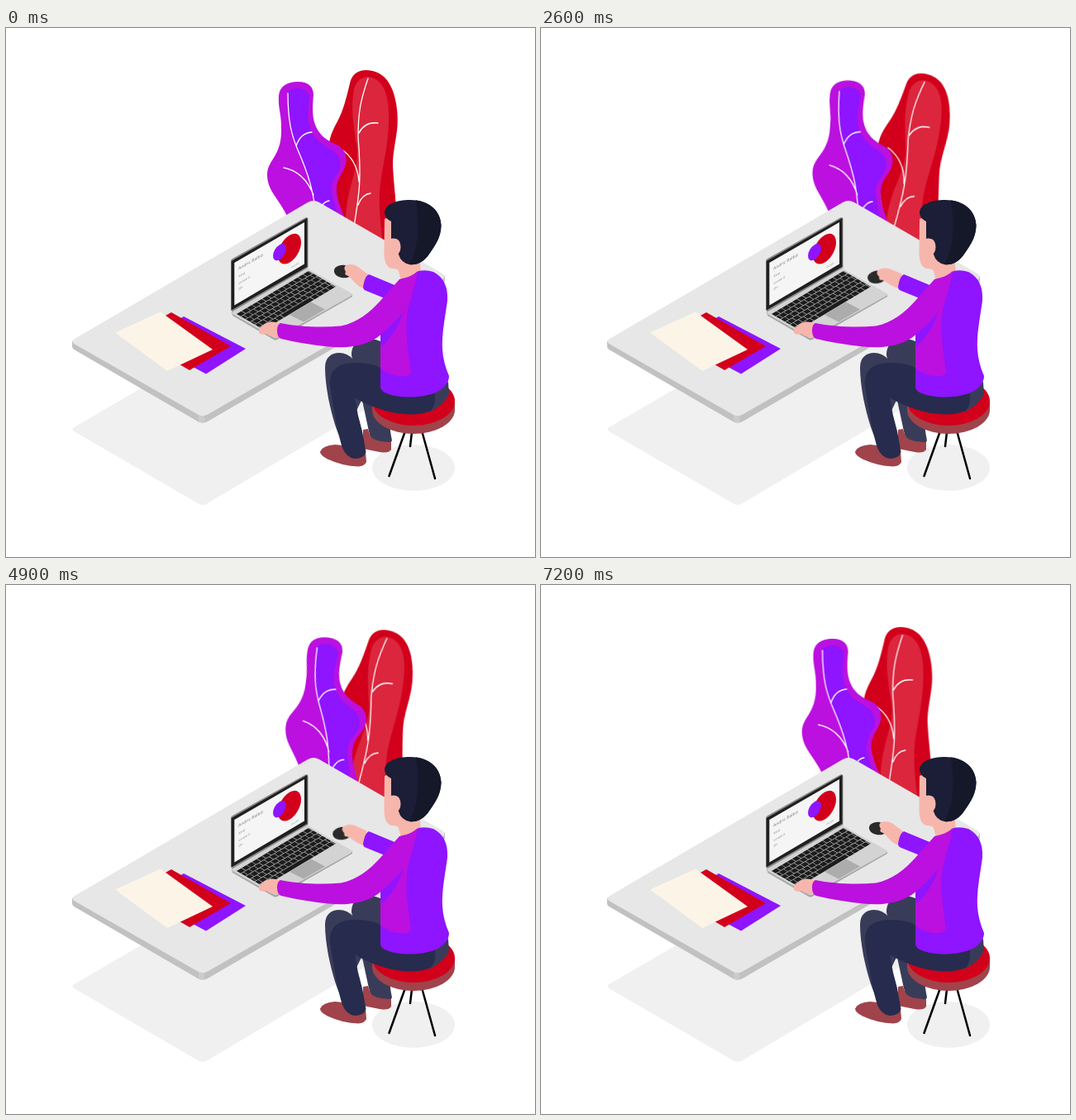
An HTML page for the animation above (8 s loop, 640 by 640 pixels).

```html
<!DOCTYPE html>
<html lang="en">
<head>
<meta charset="utf-8">
<title>Desk work</title>
<style>
html, body { margin: 0; width: 100%; height: 100%; overflow: hidden; background: #fff; }
svg { display: block; width: 100vw; height: 100vh; }
text { font-family: "Open Sans", sans-serif; fill: #777; }
.vein { fill: none; stroke: #fff; stroke-width: 1.3; stroke-linecap: round; }
.keys { fill: none; stroke: #1c1c1c; stroke-width: 4.8; stroke-dasharray: 5.5 .7; }
.skin { fill: #f7b6ac; }
.navy { fill: #272b4d; }
.slate { fill: #393c59; }
.violet { fill: #8f14ff; }
.magenta { fill: #bb10df; }
.red { fill: #d2001b; }
.brick { fill: #a0434b; }
.floor { fill: #f0f0f0; }

/* The whole scene moves in 100 ms steps. */
.sway { animation: 8s infinite; }
.leaf-red { transform-origin: 413px 295px; animation-name: leaf-red; }
.leaf-violet { transform-origin: 382px 342px; animation-name: leaf-violet; }
.hand { transform-origin: 434px 305px; animation-name: hand; }
@keyframes leaf-red {
  0% { transform: rotate(0deg); animation-timing-function: steps(36); }
  45% { transform: rotate(8.9deg); animation-timing-function: steps(36); }
  90%, 100% { transform: rotate(-.15deg); }
}
@keyframes leaf-violet {
  0% { transform: rotate(0deg); animation-timing-function: steps(48); }
  60% { transform: rotate(8deg); animation-timing-function: steps(24); }
  90%, 100% { transform: rotate(-.1deg); }
}
@keyframes hand {
  0% { transform: rotate(0deg); animation-timing-function: steps(36); }
  45% { transform: rotate(-20deg); animation-timing-function: steps(36); }
  90%, 100% { transform: rotate(0deg); }
}
</style>
</head>
<body>
<svg viewBox="0 0 640 640">
  <!-- floor shadows -->
  <path class="floor" d="M84 482L366 318Q372 314 379 318L515 396Q522 401 515 414L244 575Q238 579 232 575L84 489Q77 485 84 482Z"/>
  <ellipse class="floor" cx="493" cy="532" rx="50" ry="28"/>

  <g class="sway leaf-red">
    <path class="red" d="M416 67C419 54 428 51 436 51C455 52 463 63 468 76C473 90 475 108 473 124C471 140 468 151 468 166C469 190 473 215 475 265L420 262C408 235 394 190 391 155C389 136 394 126 401 113C408 100 412 84 416 67Z"/>
    <path fill="#db263d" d="M437 59C427 60 421 68 420 80C417 105 422 125 425 148C426 175 411 195 411 235L456 262C453 235 450 210 453 188C456 165 463 140 463 110C464 85 458 60 437 59Z"/>
    <path class="vein" d="M438 61C429 87 426 102 426 132C430 180 428 198 421 240M427 127Q434 113 450 115M403 145Q425 158 427 186M426 214Q431 201 441 200"/>
  </g>

  <g class="sway leaf-violet">
    <path class="magenta" d="M346 250C343 215 316 203 316 178C316 160 332 156 333 127C334 104 329 99 330 82C331 70 341 65 353 65C367 65 372 72 372 81C371 93 370 106 374 117C380 133 393 138 402 142C410 147 413 156 411 165C409 174 401 181 400 192C399 206 405 217 411 232V250Z"/>
    <path class="violet" d="M340 78Q345 73 354 73Q366 74 367 84C366 96 364 108 367 118C371 135 385 142 395 148C403 153 405 161 404 168C402 177 394 184 394 194C394 208 402 218 404 250L378 250C374 190 363 173 351 145C343 120 341 105 340 78Z"/>
    <path class="vein" d="M341 79C341 114 346 130 352 145C364 173 373 193 378 250M351 143Q356 127 370 126M336 169Q361 174 372 202M391 209Q382 210 377 226"/>
  </g>

  <!-- desk -->
  <path fill="#c1c1c1" d="M80 379L372 214L531 300V306Q530 310 526 312L244 476Q238 479 232 476L84 390Q80 388 80 385Z"/>
  <path fill="#cbcbcb" d="M233 468H240V477.500Q236 478 233 476.500Z"/>
  <path fill="#e7e7e7" d="M84 375.500L365 211Q372 207 379 211L527 296.500Q534 301 527 305L244 467.500Q238 471 232 467.500L84 383Q77 379 84 375.500Z"/>

  <!-- papers -->
  <path class="violet" d="M215 349L290 388L242 418.500L166 378Z"/>
  <path class="red" d="M200 344L272 385L222 414L150 372Z"/>
  <path fill="#fdf4e8" d="M132 368.500L187 343.500L250 389L195 415Z"/>

  <!-- laptop base -->
  <path fill="#a6a6a6" d="M273 343L365 292L419 322V325L328 377Q326 378 324 377L274 348Z"/>
  <path fill="#d3d3d3" d="M274 343L365 291L418 321Q420 322.500 418 324L328 374.500Q326 375.500 324 374.500L274 346Z"/>
  <g transform="matrix(1 -.598 1 .576 279 346)">
    <path fill="#a4a4a4" d="M0 0H87V33H0Z"/>
    <path class="keys" d="M0 2.500H87"/>
    <path class="keys" stroke-dashoffset="3" d="M0 8.100H87"/>
    <path class="keys" stroke-dashoffset="1" d="M0 13.700H87"/>
    <path class="keys" stroke-dashoffset="4" d="M0 19.300H87"/>
    <path class="keys" stroke-dashoffset="2" d="M0 24.900H87"/>
    <path class="keys" d="M0 30.500H24M61.500 30.500H87"/>
    <path class="keys" style="stroke-dasharray:none" d="M25 30.500H60.500"/>
  </g>
  <path fill="#acacac" d="M343 347L369 331.500L386 340.500L360 355.500Z"/>

  <!-- laptop screen -->
  <path fill="#8a8a8a" d="M272 282Q272 280 274 279L363 229Q365 229 365.500 231V290L274 343L272 341Z"/>
  <path fill="#1f1f1f" d="M272.700 282L364.500 229.800V288.800L272.700 341.500Z"/>
  <path fill="#f5f5f5" d="M276.300 284L361 235V285.500L276.300 335.500Z"/>
  <g transform="matrix(1 -.577 0 1 281 293)">
    <ellipse class="red" cx="62" cy="10" rx="14" ry="16.500"/>
    <ellipse class="violet" cx="50" cy="7" rx="8" ry="9"/>
    <text font-size="5" y="0">Andric Balbis</text>
    <g font-size="3.600">
      <text x=".5" y="9">Kind</text>
      <text x=".5" y="17.500">Lorem it</text>
      <text x=".5" y="24.500">On</text>
      <text x="64" y="35" style="fill:#999">mollit</text>
    </g>
  </g>

  <!-- typing hand -->
  <path class="skin" d="M332 357Q321 354 315 357L309 361Q305 364 306 369Q309 372 315 370Q321 375 333 374Z"/>

  <!-- mouse hand -->
  <g class="sway hand">
    <path fill="#2a2a2a" d="M397 295C396 290 402 286 410 287C417 289 419 295 417 300C412 304 399 303 397 295Z"/>
    <path class="skin" d="M410 293Q408 288 413 286.500Q420 284.500 426 289L438 298L434 315Q427 314 421 307Q416 301 413 299.500Q409 299 411 295Z"/>
  </g>
  <path class="violet" d="M439 298Q434 300 432 313Q432 317 436 318L463 329L475 313Z"/>

  <!-- far leg -->
  <path class="slate" d="M418 396C418 381 428 376 438 376Q449 376 456 381L466 440L463 465Q464 485 467 499Q463 508 451 505Q441 500 439 488L430 446Z"/>
  <path class="brick" d="M432 486L438 485Q440 497 449 499Q459 501 466 501V510Q463 515 452 513L432 509Z"/>

  <!-- stool -->
  <g fill="none" stroke="#000" stroke-width="2.500" stroke-linecap="round">
    <path d="M482.500 489L463.500 542M503.500 489L519 545M491 489L489 506"/>
  </g>
  <path class="brick" d="M443 451V462A50 29 0 0 0 543 462V451Z"/>
  <ellipse class="red" cx="493" cy="451.500" rx="50" ry="29.500"/>

  <!-- near leg -->
  <path class="brick" d="M380 512.500Q383 505 398 504L408 505L435 512L436 525Q434 530 426 530.500Q407 530 389 521.500Q380 517 380 512.500Z"/>
  <path class="slate" d="M386 411C386 398 394 393 403 393Q413 393 420 401L453 410L440 430L406 500Q397 482 390 448Q386 426 386 411Z"/>
  <path class="slate" d="M510 440L535 428L536 443Q530 456 512 465Z"/>
  <path class="navy" d="M392 432C391 415 400 406 420 405Q440 404 453 411V436L519 442Q520 457 514 463C495 471 468 467 450 460Q434 455 422 447Q425 468 431 488L435.500 513Q433 521 422 521Q412 520 407 508Q400 487 392 432Z"/>

  <!-- neck and face -->
  <path class="skin" d="M466 228L458 231L457.500 270Q457 288 466 291Q474 291 475 294L478 306Q492 309 502 295L500 276Z"/>

  <!-- torso and near arm -->
  <path class="violet" d="M480 304Q495 299 499 294Q508 292 517 295C531 302 535 316 534 330C531 352 527 370 528 389Q529 405 536 421Q536 428 531 433C521 447 480 451 458 441Q453 438 453 434V370Z"/>
  <path class="magenta" d="M478 304Q491 301 498 294C496 309 490 325 486 342C482 370 487 390 490 417Q486 424 469 420Q458 417 453 411V383L465 335Z"/>
  <path class="violet" d="M481 340Q470 351 454 372V386Q476 365 481 340Z"/>
  <path class="magenta" d="M332 357C352 361 380 363 405 360.500C425 357 441 343 452 331L476 304L492 300Q493 319 485 337C477 350 463 363 451 373C436 385 411 388 390 385.500Q357 382 333 376Q328 374 328 366Q328 359 332 357Z"/>

  <!-- hair and ear -->
  <path fill="#1b1e36" d="M458 224C458 213 472 208 489 208C511 208 526 221 526.500 239C526 253 520 262 513 272C505 284 497 287 488 286Q478 284 475 274L466 255V234Q459 231 458 224Z"/>
  <path fill="#151829" d="M496 208.500C514 211 526 222 526.500 239C526 253 520 262 513 272C505 284 497 287 488 286C499 267 501 240 496 208.500Z"/>
  <path class="skin" d="M465 255Q475 253 477 261Q479 270 473 275Q468 277 464 273Z"/>
</svg>
</body>
</html>
```
